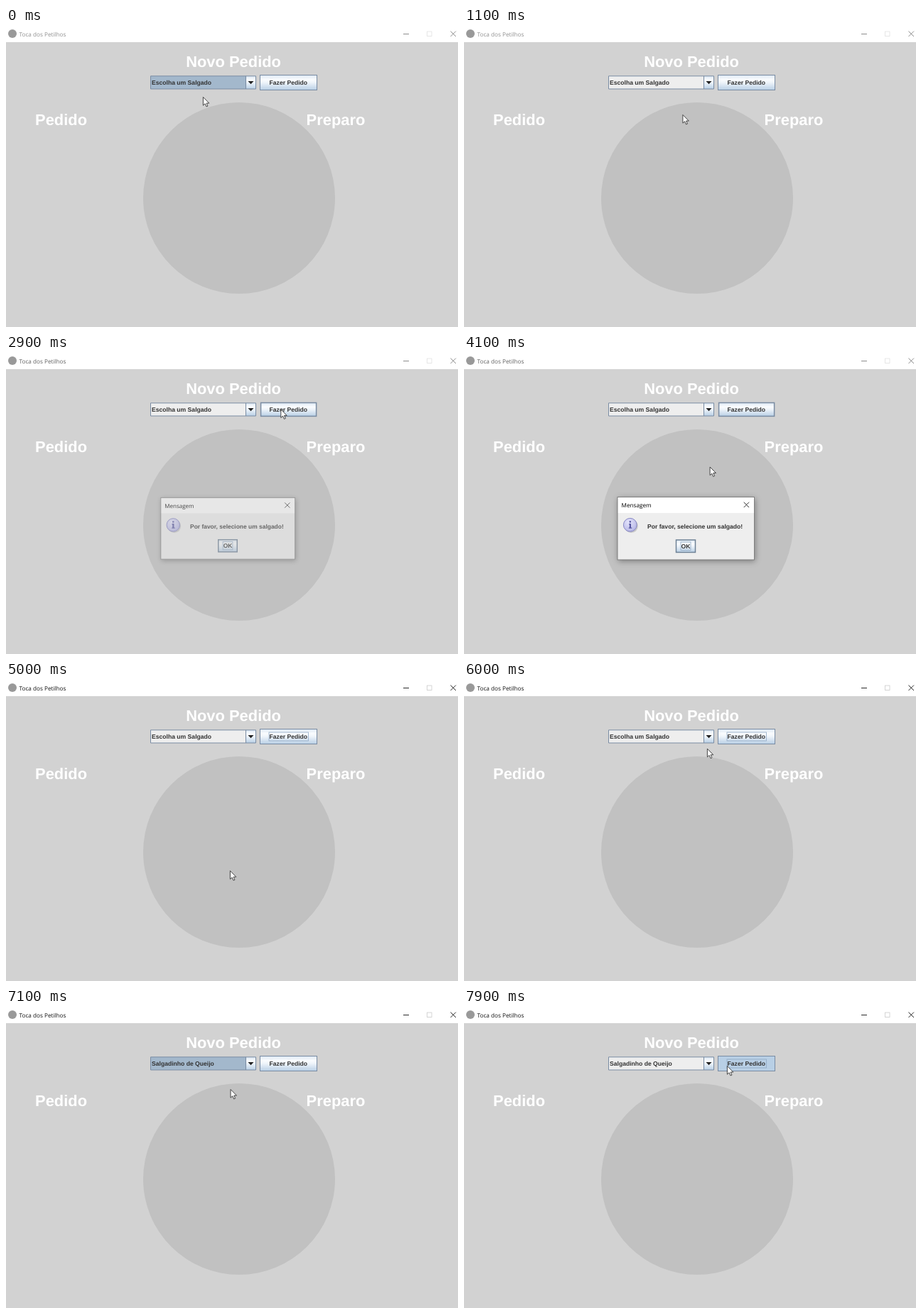
An HTML page that plays this animation: 636 px wide and 422 px high, repeating every 8 s.

```html
<!DOCTYPE html>
<html lang="pt">
<head>
<meta charset="utf-8">
<title>Toca dos Petilhos</title>
<style>
html, body { margin: 0; width: 100%; height: 100%; overflow: hidden; background: #d2d2d2; }
svg { display: block; width: 636px; height: 422px; }
text { text-rendering: geometricPrecision; white-space: pre; }
.head { font: bold 21.9px "Liberation Sans", Arial, sans-serif; fill: #fff; }
.ui { font: bold 8.6px "Liberation Sans", Arial, sans-serif; fill: #333; }
.win { font: 8.2px "Open Sans", "Segoe UI", sans-serif; }
.edge { fill: none; stroke: #7a8ca3; }
.ring { fill: none; stroke: #8fa9c4; stroke-width: .8; }
.glyph { fill: none; stroke-width: .9; }
</style>
</head>
<body>
<svg viewBox="0 0 636 422">
  <defs>
    <linearGradient id="ocean" x2="0" y2="1">
      <stop offset="0" stop-color="#dde8f3"/>
      <stop offset=".3" stop-color="#fafcfe"/>
      <stop offset=".5" stop-color="#eef4fa"/>
      <stop offset="1" stop-color="#b8cfe5"/>
    </linearGradient>
    <radialGradient id="orb" cx=".4" cy=".3" r=".75">
      <stop offset="0" stop-color="#e4e4fc"/>
      <stop offset="1" stop-color="#b4b4e4"/>
    </radialGradient>
    <filter id="shadow" x="-15%" y="-25%" width="130%" height="150%">
      <feDropShadow dx="1" dy="2" stdDeviation="4" flood-opacity=".38"/>
    </filter>
  </defs>

  <rect width="636" height="422" fill="#d2d2d2"/>
  <circle cx="328" cy="240" r="135" fill="#c1c1c1"/>

  <rect width="636" height="20" fill="#fff"/>
  <circle cx="9" cy="8" r="6" fill="#999"/>
  <g id="bar">
    <text id="title" class="win" x="18.5" y="11.7">Toca dos Petilhos</text>
    <path id="controls" class="glyph" d="M559 8.5h8M625.5 4.5l7.5 7.5m0-7.5l-7.5 7.5"/>
    <rect id="maximize" class="glyph" x="592.5" y="5" width="6.5" height="6.5"/>
  </g>

  <text class="head" x="253.2" y="55">Novo Pedido</text>
  <text class="head" x="41.1" y="137.2">Pedido</text>
  <text class="head" x="422.6" y="137.2">Preparo</text>

  <g id="combo">
    <rect id="field" x="203.5" y="67.8" width="134" height="18.2"/>
    <rect x="337.5" y="67.8" width="14" height="18.2" fill="url(#ocean)"/>
    <path class="edge" d="M203.5 67.8h148v18.2h-148zM337.5 67.8v18.2"/>
    <path d="M340.5 75h8l-4 4.3z" fill="#222"/>
    <text id="choice" class="ui" x="205" y="79.8"></text>
  </g>

  <g id="button">
    <rect id="face"/>
    <rect id="rim" class="edge"/>
    <rect id="focus" class="ring" x="370" y="71" width="55.5" height="12"/>
    <text class="ui" x="370.6" y="80.2">Fazer Pedido</text>
  </g>

  <g id="popup">
    <rect x="203.5" y="86.5" width="148" height="66.5" fill="#eee" stroke="#333"/>
    <rect id="mark" x="204" width="147" height="13.2" fill="#a3b8cc"/>
  </g>

  <g id="dialog">
    <g filter="url(#shadow)">
      <rect x="216" y="200.5" width="192.5" height="88.5" fill="#eee"/>
    </g>
    <rect x="216" y="200.5" width="192.5" height="22.5" fill="#fff"/>
    <rect x="216" y="200.5" width="192.5" height="88.5" fill="none" stroke="#777" stroke-width=".9"/>
    <text class="win" x="221.5" y="215">Mensagem</text>
    <path class="glyph" d="M393.7 207.7l7.4 7.4m0-7.4l-7.4 7.4" stroke="#222"/>
    <circle cx="235.3" cy="241.5" r="9.5" fill="#aaa" opacity=".55"/>
    <circle cx="233.8" cy="239.8" r="9.4" fill="url(#orb)" stroke="#8585c4"/>
    <path d="M232 238h3v5.5h1.2v1.3h-4.4v-1.3h1v-4.2h-.8zM232.6 234.2h2.4v2.2h-2.4z" fill="#5656a0"/>
    <text class="ui" x="258" y="245">Por favor, selecione um salgado!</text>
    <rect id="okFace" x="298.5" y="261" width="27" height="17.5" stroke="#6f8296" stroke-width="1.5"/>
    <rect class="ring" x="305" y="264" width="14" height="11.5"/>
    <text class="ui" x="305.6" y="273">OK</text>
  </g>

  <path id="cursor" d="M.4.5V12.2L3.1 9.8L5 14L6.9 13.2L5.1 9.1H8.8Z" fill="#fff" stroke="#333" stroke-width=".9" stroke-linejoin="round"/>
</svg>
<script>
const LOOP = 8000, STEP = 100, ROW = 13.2, LIST_TOP = 87.3;
const items = ["Escolha um Salgado", "Coxinha de Charque", "Salgadinho de Queijo",
  "Folhado de Frango", "Pastel de Belém"];
const normalBox = { x: 357.5, y: 66.5, width: 80, height: 21 };
const hoverBox = { x: 358.6, y: 67.4, width: 78, height: 19 };

// Pointer stops: time, x, y
const stops = [
  [0, 277, 97], [300, 243, 128], [600, 240, 145], [900, 285, 132], [1300, 330, 112],
  [1800, 374, 83], [2100, 386.4, 76.3], [3400, 386.4, 76.3], [3700, 386, 79],
  [4100, 345.7, 157.5], [4600, 312, 262], [4700, 312, 266], [5000, 315, 266], [5400, 321, 230],
  [5800, 338, 125], [6100, 344, 78], [6300, 344, 78], [6600, 322, 113], [6800, 312, 118],
  [7000, 311, 118], [7300, 325, 103], [7600, 352, 88], [7800, 370, 80], [8000, 370, 80]
];

const $ = id => document.getElementById(id);
const set = (id, attrs) => { for (const k in attrs) $(id).setAttribute(k, attrs[k]); };
const show = (id, on) => set(id, { visibility: on ? "visible" : "hidden" });
const within = (t, a, b) => t >= a && t < b;
const clamp = v => Math.max(0, Math.min(1, v));

items.forEach((label, i) => {
  const row = document.createElementNS("http://www.w3.org/2000/svg", "text");
  row.setAttribute("class", "ui");
  row.setAttribute("x", 204.7);
  row.setAttribute("y", 97.2 + i * ROW);
  row.textContent = label;
  $("popup").append(row);
});

function pointer(t) {
  const i = stops.findIndex(s => s[0] > t);
  const [t0, x0, y0] = stops[i - 1], [t1, x1, y1] = stops[i];
  const k = (t - t0) / (t1 - t0);
  return [x0 + (x1 - x0) * k, y0 + (y1 - y0) * k];
}

function drawTitleBar(t) {
  const active = t >= 4800;
  set("title", { fill: active ? "#111" : t < 2600 ? "#909090" : "#606060" });
  set("controls", { stroke: active ? "#111" : "#808080" });
  set("maximize", { stroke: active ? "#d0d0d0" : "#e4e4e4" });
}

function drawCombo(t, y) {
  const focused = t < 500 || within(t, 7000, 7800);
  set("field", { fill: focused ? "#a3b8cc" : "#eee" });
  $("choice").textContent = items[t < 7000 ? 0 : 2];
  show("popup", within(t, 6300, 7000));
  const row = Math.max(0, Math.min(4, Math.floor((y - LIST_TOP) / ROW)));
  set("mark", { y: LIST_TOP + row * ROW });
}

function drawButton(t, x, y) {
  const pressed = within(t, 2600, 2700) || t >= 7800;
  const over = x > 357 && x < 438 && y > 66 && y < 88;
  const hover = !pressed && (over || within(t, 2600, 4800));
  const box = hover ? hoverBox : normalBox;
  set("face", { ...box, fill: pressed ? "#b8cfe5" : "url(#ocean)" });
  set("rim", {
    ...box,
    stroke: hover ? "#7f9fc2" : pressed ? "#6f8296" : "#7f92a8",
    "stroke-width": hover ? 1.5 : 1
  });
  show("focus", within(t, 2600, 2800) || within(t, 4800, 6300) || t >= 7800);
}

function drawDialog(t) {
  const open = within(t, 2800, 5000);
  show("dialog", open);
  if (!open) return;
  const level = t < 4800 ? clamp((t - 2700) / 320) : clamp((5000 - t) / 300);
  const scale = 0.95 + 0.05 * level;
  set("dialog", {
    opacity: level,
    transform: `translate(312.3 244.5) scale(${scale}) translate(-312.3 -244.5)`
  });
  set("okFace", { fill: within(t, 4700, 4900) ? "#b8cfe5" : "url(#ocean)" });
}

function draw(t) {
  const [x, y] = pointer(t);
  set("cursor", { transform: `translate(${x} ${y})` });
  drawTitleBar(t);
  drawCombo(t, y);
  drawButton(t, x, y);
  drawDialog(t);
}

const start = performance.now();
function tick() {
  const t = (performance.now() - start) % LOOP;
  draw(Math.floor(t / STEP) * STEP);
  requestAnimationFrame(tick);
}
tick();
</script>
</body>
</html>
```
